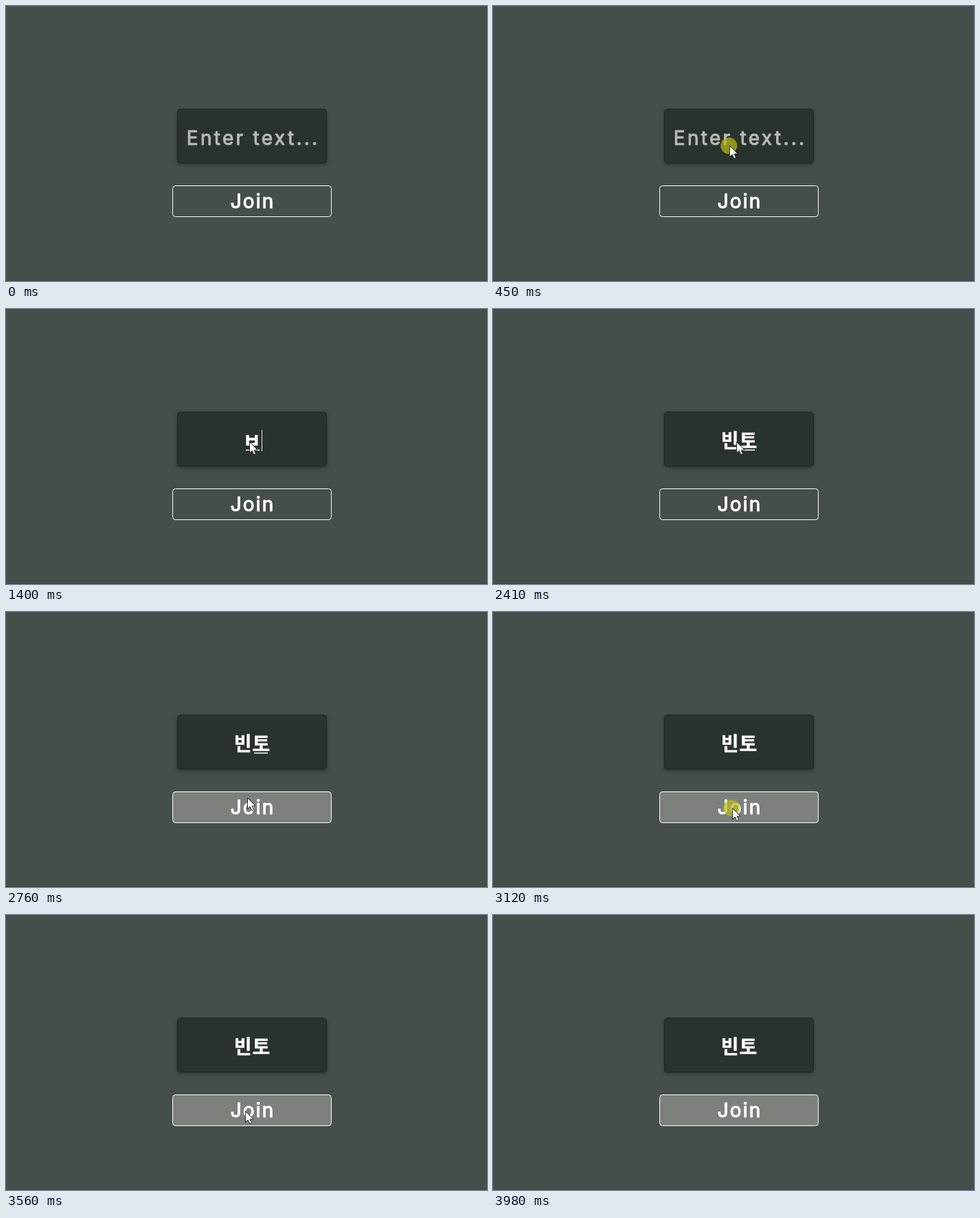
Write an HTML page with a canvas that moves like this. It is 700 by 400 pixels and loops after 5270 ms.

```html
<!DOCTYPE html>
<html lang="en">
<head>
<meta charset="utf-8">
<title>Join form</title>
<style>
  html, body { margin: 0; width: 100%; height: 100%; overflow: hidden; background: #454e48; }
  canvas { display: block; }
</style>
</head>
<body>
<canvas id="stage" width="700" height="400"></canvas>
<script>
const ctx = document.getElementById('stage').getContext('2d');
const LOOP = 5270;
const MID = 358;
const LATIN = '400 28px Inter, "Open Sans", sans-serif';
const HANGUL = '700 28px "Noto Sans CJK KR", "Noto Sans CJK", sans-serif';

// Pointer path: [time, x, y]
const path = [
  [80, 626, 402], [240, 480, 300], [410, 344, 203], [610, 344, 203],
  [690, 353, 190], [730, 354, 190], [930, 354, 190], [1000, 354, 193],
  [2590, 354, 193], [2750, 351, 270], [2940, 351, 270],
  [3040, 348, 285], [3780, 348, 285], [3980, 592, 404]
];
const typed = [[1400, 'ㅂ'], [1470, '비'], [1600, '빈'], [1740, '빈ㅌ'], [1810, '빈토']];
const caretX = [358, 372, 384];
const caretOn = [[550, 1070], [1400, 2410], [2960, 3060]];
const clicks = [[430, 550], [3060, 3180]];
const BLUR = 3060;

const clamp = v => Math.max(0, Math.min(1, v));
const within = (t, spans) => spans.some(([a, b]) => t >= a && t < b);

function box(x, y, w, h, r) {
  ctx.beginPath();
  ctx.roundRect(x, y, w, h, r);
}

// A thin round outline softens the corners of the letters.
function label(text, y, font, color, spacing, line) {
  ctx.font = font;
  ctx.letterSpacing = spacing + 'px';
  ctx.textAlign = 'center';
  ctx.fillStyle = ctx.strokeStyle = color;
  ctx.lineWidth = line;
  ctx.lineJoin = 'round';
  ctx.strokeText(text, MID + spacing / 2, y);
  ctx.fillText(text, MID + spacing / 2, y);
}

function drawBack() {
  ctx.fillStyle = '#454e48';
  ctx.fillRect(0, 0, 700, 400);
  ctx.fillStyle = '#3d4540';
  ctx.fillRect(0, 399, 700, 1);
}

function drawField(t) {
  ctx.save();
  ctx.shadowColor = 'rgba(0, 0, 0, 0.35)';
  ctx.shadowBlur = 5;
  ctx.shadowOffsetY = 2;
  ctx.fillStyle = '#2a322d';
  box(249, 149.5, 218, 79.5, 5);
  ctx.fill();
  ctx.restore();
  ctx.strokeStyle = '#222925';
  ctx.lineWidth = 1;
  box(249.5, 150, 217, 78.5, 4.5);
  ctx.stroke();

  const step = typed.filter(s => t >= s[0]).pop();
  const text = step ? step[1] : '';
  const x = caretX[text.length];
  if (text) {
    label(text, 201.5, HANGUL, '#fff', 0.8, 0.5);
    if (t < BLUR) {
      ctx.fillStyle = '#fff';
      ctx.fillRect(x - 23, 204.5, 20, 1.5);
    }
  } else {
    label('Enter text...', 201.5, LATIN, '#b9bab8', 3.3, 1);
  }
  if (within(t, caretOn)) {
    ctx.fillStyle = '#e8eae8';
    ctx.fillRect(x, 176, 1, 31);
  }
}

function drawButton(t) {
  box(242.6, 261.5, 230.8, 45, 4);
  const hover = clamp((t - 2650) / 100);
  ctx.fillStyle = `rgba(124, 129, 124, ${hover})`;
  ctx.fill();
  ctx.strokeStyle = '#fff';
  ctx.lineWidth = 1;
  ctx.stroke();
  label('Join', 293.5, LATIN, '#fff', 2.2, 1.2);
}

function pointerAt(t) {
  const i = path.findIndex(p => p[0] > t);
  if (i < 1) return null;
  const [t0, x0, y0] = path[i - 1];
  const [t1, x1, y1] = path[i];
  const k = (t - t0) / (t1 - t0);
  return [x0 + (x1 - x0) * k, y0 + (y1 - y0) * k];
}

function drawPointer(t) {
  const pos = pointerAt(t);
  if (!pos) return;
  const [x, y] = pos.map(Math.round);
  if (within(t, clicks)) {
    ctx.fillStyle = 'rgba(188, 188, 20, 0.7)';
    ctx.beginPath();
    ctx.arc(x - 0.7, y + 0.3, 12, 0, Math.PI * 2);
    ctx.fill();
  }
  ctx.save();
  ctx.translate(x + 0.5, y + 0.5);
  ctx.beginPath();
  ctx.moveTo(0, 0);
  ctx.lineTo(0, 16);
  ctx.lineTo(3.7, 12.6);
  ctx.lineTo(6.3, 18.3);
  ctx.lineTo(9, 17.1);
  ctx.lineTo(6.5, 11.6);
  ctx.lineTo(11.5, 11.4);
  ctx.closePath();
  ctx.fillStyle = '#fff';
  ctx.fill();
  ctx.strokeStyle = '#252b28';
  ctx.lineWidth = 1;
  ctx.stroke();
  ctx.restore();
}

function draw(t) {
  drawBack();
  drawField(t);
  drawButton(t);
  drawPointer(t);
}

const start = performance.now();
function tick() {
  draw((performance.now() - start) % LOOP);
  requestAnimationFrame(tick);
}
draw(0);
requestAnimationFrame(tick);
</script>
</body>
</html>
```
